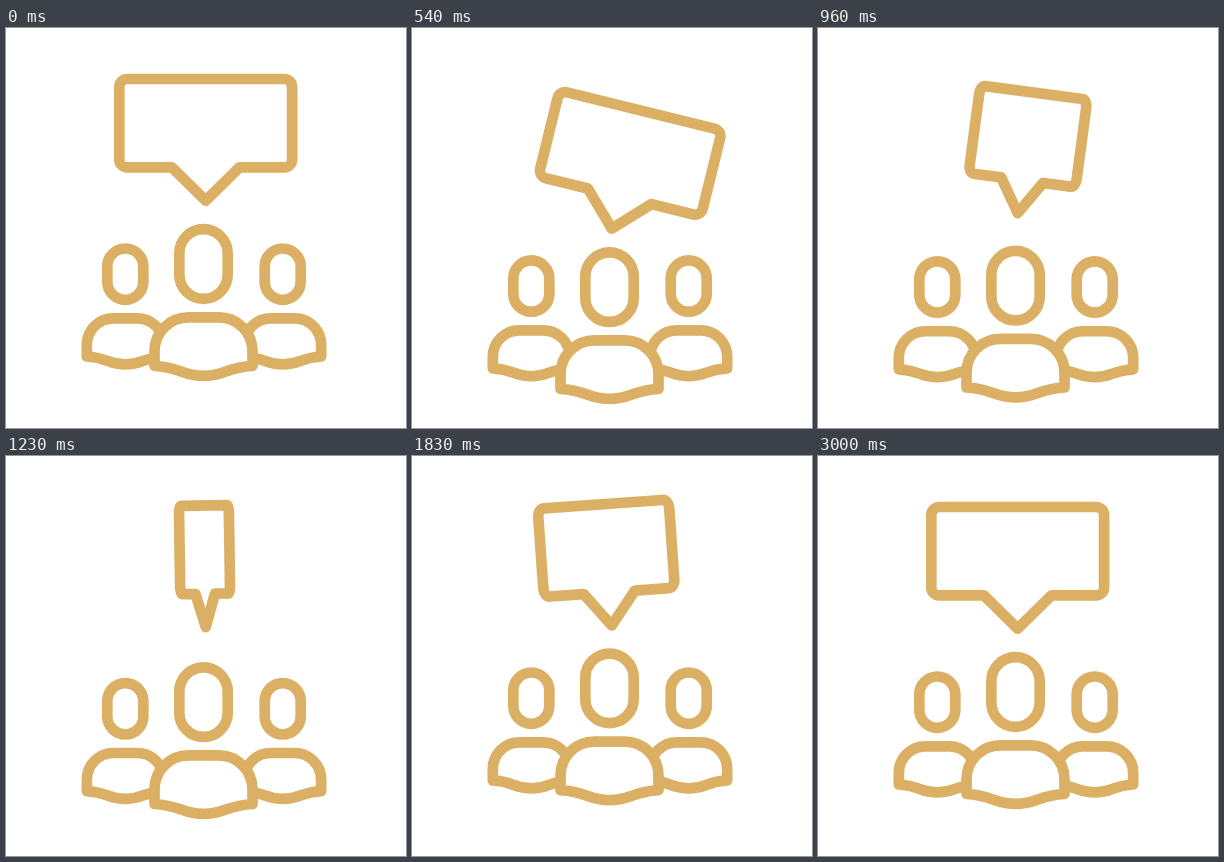
An HTML page without scripts that plays this animation: 400 px wide and 400 px high, repeating every 5090 ms.

```html
<!DOCTYPE html>
<html lang="en">
<head>
<meta charset="utf-8">
<title>Group discussion</title>
<style>
  @property --turn { syntax: "<number>"; inherits: false; initial-value: 1; }

  html, body { margin: 0; width: 100%; height: 100%; overflow: hidden; background: #fff; }
  svg { display: block; width: 400px; height: 400px; fill: #fff; stroke: #dbb064; stroke-width: 10.7; stroke-linejoin: round; }
  path { vector-effect: non-scaling-stroke; }

  .person, .bob, .tilt, .turn { animation: 5090ms cubic-bezier(.33, 0, .67, 1) infinite; }
  .person { --drop: 23.8px; animation-name: duck; }
  .side { --drop: 13.3px; animation-delay: 60ms; }
  .bob { animation-name: bob; }
  .tilt { animation-name: tilt; }
  .turn { animation-name: turn; transform: scaleX(var(--turn)); }

  @keyframes duck {
    0%, 46.6%, 100% { translate: 0 0; }
    11.8%, 16.1% { translate: 0 var(--drop); }
    32.6% { translate: 0 -4.3px; }
  }
  @keyframes bob {
    0%, 43.6%, 100% { translate: 0 0; }
    10.6% { translate: 0 28px; }
    28.3% { translate: 0 -6.3px; }
  }
  @keyframes tilt {
    0%, 58.9%, 100% { rotate: 0deg; }
    11.8% { rotate: 14.2deg; }
    30.7% { rotate: -6.6deg; }
    47.2% { rotate: 4deg; }
  }
  /* speeds up until edge-on, then slows down to the mirrored side */
  @keyframes turn {
    0% { --turn: 1; }
    7.7% { --turn: 1; animation-timing-function: cubic-bezier(.33, 0, .67, .55); }
    28.5% { --turn: 0; animation-timing-function: cubic-bezier(.33, .67, .67, 1); }
    43.2%, 100% { --turn: -1; }
  }
</style>
</head>
<body>
<svg viewBox="0 0 400 400">
  <defs>
    <path id="body" d="M-15 0H15C34 0 49 15 49 34V48.5C22 50 22 58.5 0 58.5S-22 50 -49 48.5V34C-49 15 -34 0 -15 0Z"/>
    <g id="side">
      <rect x="-18" y="220.5" width="36" height="51.3" rx="18"/>
      <use href="#body" transform="translate(0 290.4) scale(.785)"/>
    </g>
  </defs>

  <g class="person side">
    <use href="#side" x="119.3"/>
    <use href="#side" x="276.7"/>
  </g>

  <g class="person">
    <rect x="173.3" y="201.2" width="48.4" height="69.6" rx="24.2"/>
    <use href="#body" x="197.5" y="289.3"/>
  </g>

  <!-- the tip of the tail is the pivot -->
  <g transform="translate(199.7 172.6)">
    <g class="bob">
      <g class="tilt">
        <path class="turn" d="M0 0L-33.8 -33.2H-78.4a8 8 0 0 1 -8 -8v-72.4a8 8 0 0 1 8 -8H78.4a8 8 0 0 1 8 8v72.4a8 8 0 0 1 -8 8H33.8Z"/>
      </g>
    </g>
  </g>
</svg>
</body>
</html>
```
